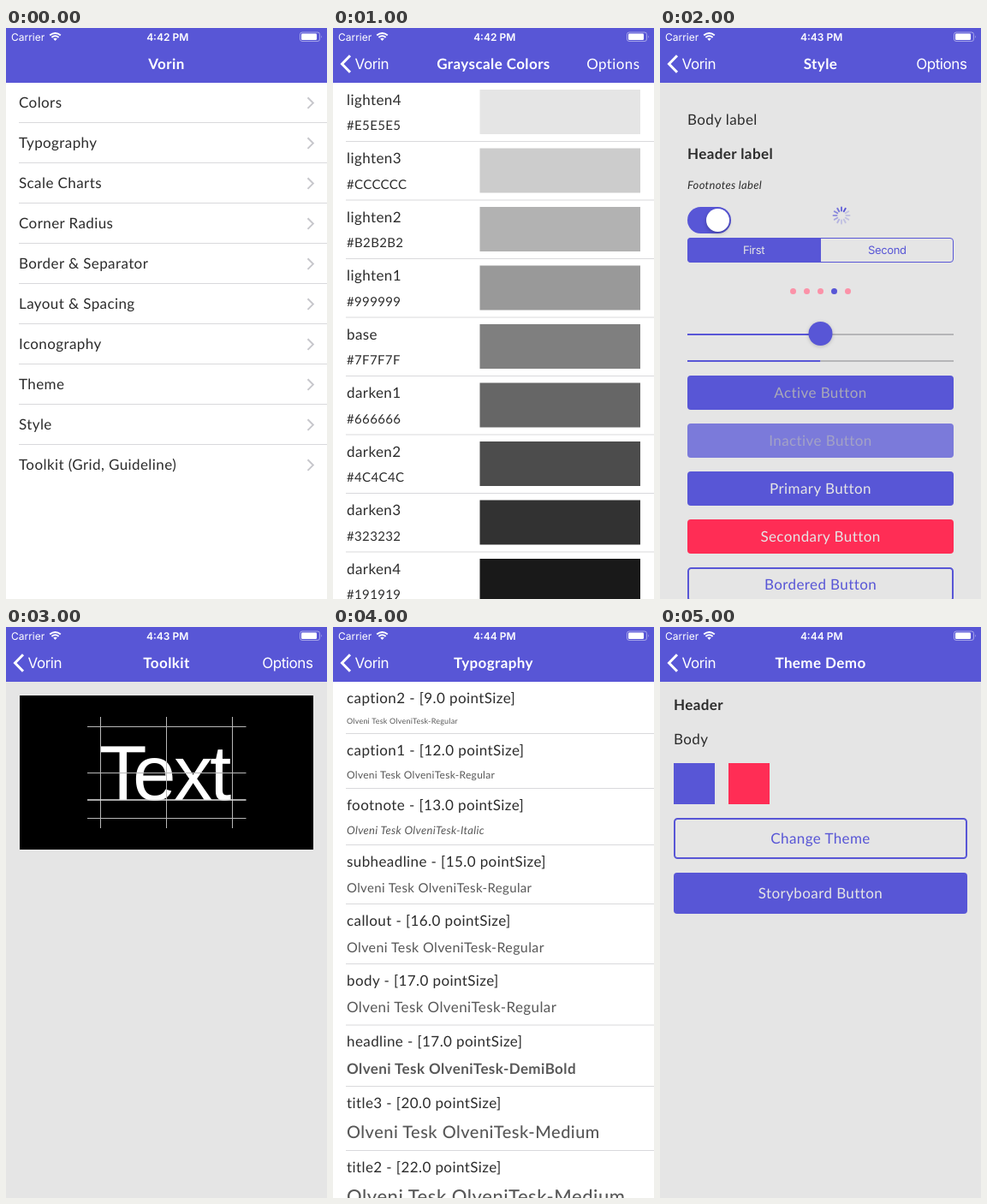
An HTML page that plays this animation: 375 by 667 pixels, repeating every 6000 ms.

```html
<!DOCTYPE html>
<html lang="en">
<head>
<meta charset="utf-8">
<title>Style guide tour</title>
<style>
  html, body { margin: 0; width: 100%; height: 100%; overflow: hidden; background: #fff; }
  svg { display: block; width: 375px; height: 667px; }
  text { font: 17px Lato, "Open Sans", sans-serif; letter-spacing: .024em; fill: #2c2c2c; white-space: pre; text-rendering: geometricPrecision; }
  .bold { font-weight: 700; }
  .medium { font-weight: 500; }
  .italic { font-style: italic; }
  .ui { font-family: Inter, Roboto, sans-serif; letter-spacing: -.025em; }
  .status { font-size: 12px; letter-spacing: 0; }
  .status.bold { font-weight: 600; }
  .mid { text-anchor: middle; }
  .end { text-anchor: end; }
</style>
</head>
<body>
<svg id="stage" viewBox="0 0 375 667"></svg>
<script>
const PURPLE = '#5856d6', RED = '#ff2d55', PAPER = '#e5e5e5', RULE = '#d9d9dc';
const APP = 'Vorin', FACE = 'Olveni Tesk';
const STEP = 1000;

const text = (str, x, y, { cls = '', size, fill } = {}) => {
  const style = (size ? `font-size:${size}px;` : '') + (fill ? `fill:${fill}` : '');
  return `<text x="${x}" y="${y}" class="${cls}" style="${style}">${str}</text>`;
};
const rect = (x, y, w, h, fill, extra = '') =>
  `<rect x="${x}" y="${y}" width="${w}" height="${h}" fill="${fill}" ${extra}/>`;
const circle = (x, y, r, fill, extra = '') =>
  `<circle cx="${x}" cy="${y}" r="${r}" fill="${fill}" ${extra}/>`;
const path = (d, color, width, extra = '') =>
  `<path d="${d}" fill="none" stroke="${color}" stroke-width="${width}" ${extra}/>`;
const separator = y => rect(15, y, 360, 1, RULE);
const each = (list, draw) => list.map(draw).join('');

function button(label, x, y, w, h, { fill = PURPLE, color = PAPER, outlined = false } = {}) {
  const box = outlined
    ? rect(x + 1, y + 1, w - 2, h - 2, 'none', `rx="3.5" stroke="${PURPLE}" stroke-width="2"`)
    : rect(x, y, w, h, fill, 'rx="4"');
  return box + text(label, 187.5, y + h / 2 + 6, { cls: 'mid', fill: outlined ? PURPLE : color });
}

function statusBar(clock) {
  const wifi = path('M51.2 8.6 Q57.5 3.4 63.8 8.6 M53.4 11 Q57.5 7.6 61.6 11', '#fff', 2) +
    '<path d="M55.2 12.6 Q57.5 10.8 59.8 12.6 L57.5 15 Z" fill="#fff"/>';
  const battery = rect(343.5, 5, 23, 10.5, 'none', 'rx="2.5" stroke="#fff" stroke-opacity=".45"') +
    rect(345, 6.5, 18, 7.5, '#fff', 'rx="1.2"') +
    '<path d="M368 8.5 q1.6 1.7 0 3.6 z" fill="#fff" opacity=".5"/>';
  return text('Carrier', 6, 14.5, { cls: 'ui status', fill: '#fff' }) + wifi +
    text(clock, 188.7, 14.5, { cls: 'ui status bold mid', fill: '#fff' }) + battery;
}

function header({ title, clock, back = true, options }) {
  let out = rect(0, 0, 375, 64, PURPLE) + statusBar(clock) +
    text(title, 187.5, 48, { cls: 'bold mid', fill: '#fff' });
  if (back) {
    out += path('M20 32.2 L10.5 42 L20 51.8', '#fff', 3) +
      text(APP, 25.5, 48, { cls: 'ui', fill: '#fff' });
  }
  if (options) out += text('Options', 358.5, 48, { cls: 'end ' + options, fill: '#fff' });
  return out;
}

function menu() {
  const items = ['Colors', 'Typography', 'Scale Charts', 'Corner Radius', 'Border &amp; Separator',
    'Layout &amp; Spacing', 'Iconography', 'Theme', 'Style', 'Toolkit (Grid, Guideline)'];
  return each(items, (item, i) => {
    const top = 64 + i * 47;
    return text(item, 15, top + 29) +
      path(`M352.5 ${top + 17.3} l6.3 6.3 l-6.3 6.3`, '#c7c7cc', 2) +
      (i < items.length - 1 ? separator(top + 46) : '');
  });
}

function grayscale() {
  const shades = [['lighten4', '#E5E5E5'], ['lighten3', '#CCCCCC'], ['lighten2', '#B2B2B2'],
    ['lighten1', '#999999'], ['base', '#7F7F7F'], ['darken1', '#666666'],
    ['darken2', '#4C4C4C'], ['darken3', '#323232'], ['darken4', '#191919']];
  return each(shades, ([name, hex], i) => {
    const top = 64 + i * 68.5;
    return text(name, 16, top + 25.5) + text(hex, 16, top + 55, { size: 15 }) +
      rect(171.5, top + 8, 187.5, 52, hex) + separator(top + 68);
  });
}

function spinner(cx, cy) {
  return each([...Array(12).keys()], i => {
    const fade = Math.max(.25, 1 - ((13 - i) % 12) * .11);
    return path(`M${cx} ${cy - 5.5} v-4`, PURPLE, 1.9,
      `stroke-linecap="round" opacity="${fade}" transform="rotate(${i * 30} ${cx} ${cy})"`);
  });
}

function track(y) {
  return rect(32, y, 155.5, 2, PURPLE) + rect(187.5, y, 155.5, 2, '#b5b5b7');
}

function controls() {
  const shadow = 'style="filter:drop-shadow(0 2px 2px rgba(0,0,0,.25))"';
  const labels = text('Body label', 32, 113) +
    text('Header label', 32, 152.5, { cls: 'bold' }) +
    text('Footnotes label', 32, 188, { cls: 'italic', size: 13 });
  const toggle = rect(32, 209, 51, 31, PURPLE, 'rx="15.5"') + circle(67.5, 224.5, 13.5, '#fff', shadow);
  const segments = rect(32.5, 245.5, 310, 28, 'none', `rx="3.5" stroke="${PURPLE}"`) +
    `<path d="M188 245 H36 a4 4 0 0 0 -4 4 V270 a4 4 0 0 0 4 4 H188 Z" fill="${PURPLE}"/>` +
    text('First', 109.5, 264.3, { cls: 'ui mid', size: 13, fill: PAPER }) +
    text('Second', 265.3, 264.3, { cls: 'ui mid', size: 13, fill: PURPLE });
  const pages = each([0, 1, 2, 3, 4], i => circle(155.5 + i * 16, 307.5, 3.5, i === 3 ? PURPLE : '#fb92a8'));
  const slider = track(357) + circle(187.5, 357, 14, PURPLE, 'style="filter:drop-shadow(0 1px 2px rgba(0,0,0,.2))"');
  const buttons = [
    ['Active Button', { color: '#a9a8b8' }],
    ['Inactive Button', { fill: '#7b7ada', color: '#a3a2c6' }],
    ['Primary Button', {}],
    ['Secondary Button', { fill: RED }],
    ['Bordered Button', { outlined: true }]
  ];
  return labels + toggle + spinner(212, 219) + segments + pages + slider + track(388) +
    each(buttons, ([label, look], i) => button(label, 32, 406 + i * 56, 311, 40, look));
}

function guides() {
  return rect(16, 80, 343, 180, '#000') +
    '<text x="109 148 196 238" y="202" style="font:91px \'Liberation Sans\',sans-serif;letter-spacing:0;fill:#fff">Text</text>' +
    path('M95 116.5 H280.5 M95 170.5 H280.5 M95 223.5 H280.5 M110.5 105 V235 M187.5 105 V235 M264.5 105 V235', '#b8b8b8', 1) +
    path('M95 202 H280.5', '#e0e0e0', 1.5);
}

function typography() {
  const joined = FACE.replace(' ', '');
  // name, size, name baseline, sample baseline, separator, style
  const rows = [
    ['caption2', 9, 89, 112.5, 124, 'Regular'],
    ['caption1', 12, 149.5, 176.5, 188, 'Regular'],
    ['footnote', 13, 214, 242, 254, 'Italic'],
    ['subheadline', 15, 280, 310, 323, 'Regular'],
    ['callout', 16, 348.5, 379.5, 393, 'Regular'],
    ['body', 17, 418.5, 450, 464.5, 'Regular'],
    ['headline', 17, 490, 522, 536, 'DemiBold'],
    ['title3', 20, 561.5, 596.5, 611, 'Medium'],
    ['title2', 22, 637, 673, 688, 'Medium']
  ];
  const classes = { Italic: 'italic', DemiBold: 'bold', Medium: 'medium' };
  return each(rows, ([name, size, y, sampleY, line, style]) =>
    text(`${name} - [${size.toFixed(1)} pointSize]`, 16, y) +
    text(`${FACE} ${joined}-${style}`, 16, sampleY, { cls: classes[style], size, fill: '#585858' }) +
    separator(line));
}

function themeDemo() {
  return text('Header', 16, 97, { cls: 'bold' }) + text('Body', 16, 137) +
    rect(16, 159, 48, 48, PURPLE) + rect(80, 159, 48, 48, RED) +
    button('Change Theme', 16, 223, 343, 48, { outlined: true }) +
    button('Storyboard Button', 16, 287, 343, 48);
}

const screens = [
  { title: APP, clock: '4:42 PM', back: false, body: menu },
  { title: 'Grayscale Colors', clock: '4:42 PM', options: 'regular', body: grayscale },
  { title: 'Style', clock: '4:43 PM', options: 'ui', bg: PAPER, body: controls },
  { title: 'Toolkit', clock: '4:43 PM', options: 'ui', bg: PAPER, body: guides },
  { title: 'Typography', clock: '4:44 PM', body: typography },
  { title: 'Theme Demo', clock: '4:44 PM', bg: PAPER, body: themeDemo }
];

const stage = document.getElementById('stage');
stage.innerHTML = each(screens, (s, i) =>
  `<g visibility="${i ? 'hidden' : 'visible'}">${rect(0, 0, 375, 667, s.bg || '#fff')}${s.body()}${header(s)}</g>`);
const layers = [...stage.children];

const start = performance.now();
let shown = 0;
function tick() {
  const now = Math.floor((performance.now() - start) / STEP) % layers.length;
  if (now !== shown) {
    layers[shown].setAttribute('visibility', 'hidden');
    layers[now].setAttribute('visibility', 'visible');
    shown = now;
  }
  requestAnimationFrame(tick);
}
tick();
</script>
</body>
</html>
```
